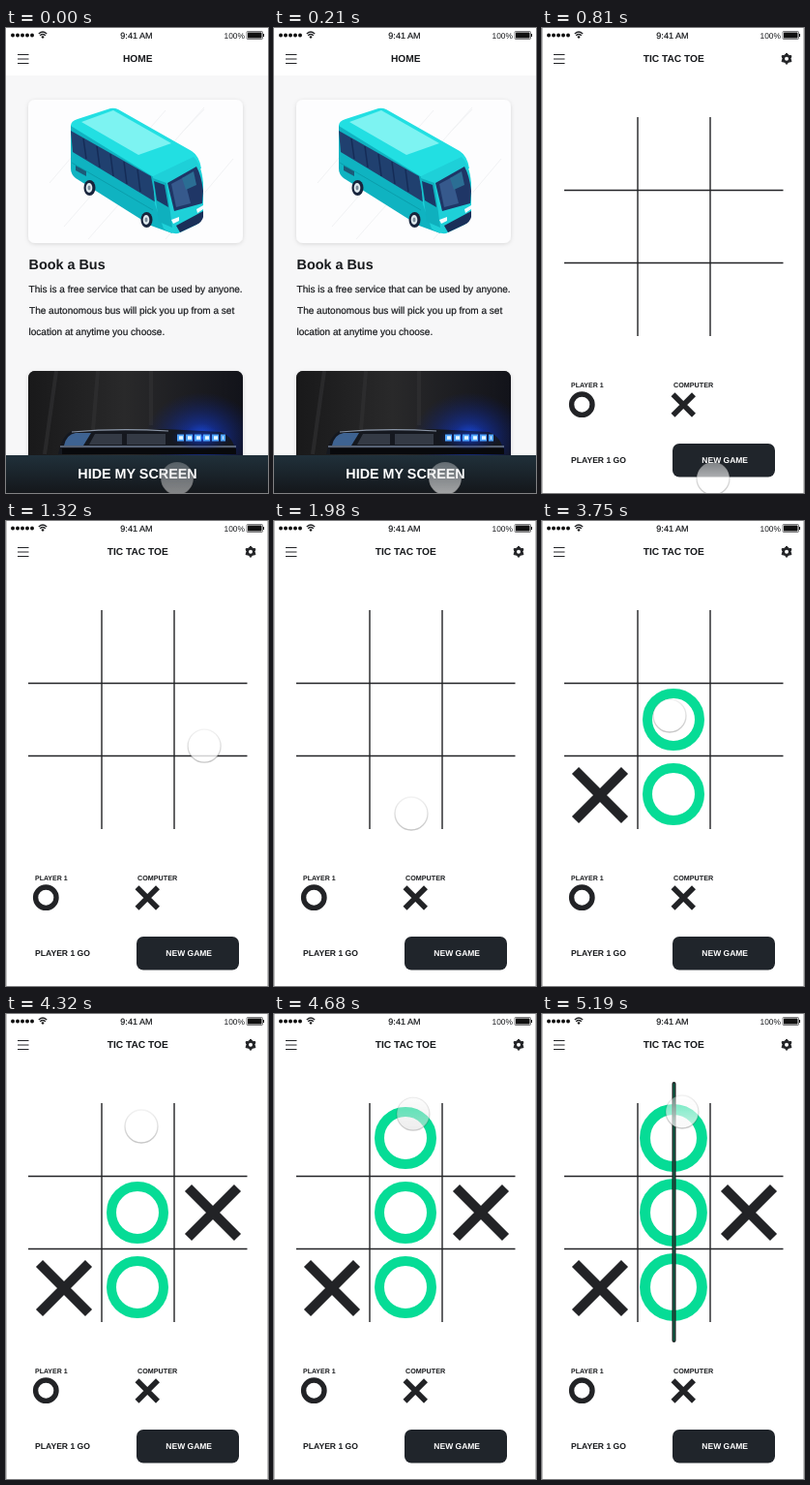
An HTML page for the animation above (5.22 s loop, 271 px wide and 480 px high).

```html
<!DOCTYPE html>
<html lang="en">
<head>
<meta charset="utf-8">
<title>Tic Tac Toe</title>
<style>
html, body { margin: 0; width: 100%; height: 100%; overflow: hidden; background: #fff; }
svg { display: block; width: 271px; height: 480px; }
text { font-family: "Liberation Sans", Arial, sans-serif; fill: #17191c; text-rendering: geometricPrecision; }
.b { font-weight: bold; }
.mid { text-anchor: middle; }
.dark { stroke: #17191c; stroke-width: .2; }
.ink { stroke: #222326; fill: none; }
.ring { stroke: #06dc96; stroke-width: 10; fill: none; }
</style>
</head>
<body>
<svg viewBox="0 0 271 480">
<defs>
  <linearGradient id="bar" x2="0" y2="1"><stop stop-color="#20303a"/><stop offset="1" stop-color="#14171b"/></linearGradient>
  <linearGradient id="night"><stop stop-color="#19191a"/><stop offset=".45" stop-color="#29292a"/><stop offset="1" stop-color="#12131a"/></linearGradient>
  <radialGradient id="glow"><stop stop-color="#2463ff"/><stop offset=".3" stop-color="#1238c4" stop-opacity=".6"/><stop offset="1" stop-color="#0a1e80" stop-opacity="0"/></radialGradient>
  <linearGradient id="knob" x2="0" y2="1"><stop stop-color="#fff" stop-opacity=".42"/><stop offset="1" stop-color="#fff" stop-opacity=".88"/></linearGradient>
  <linearGradient id="rim" x2="0" y2="1"><stop stop-color="#000" stop-opacity=".05"/><stop offset="1" stop-color="#000" stop-opacity=".22"/></linearGradient>
  <linearGradient id="press" x2="0" y2="1"><stop stop-color="#555" stop-opacity=".04"/><stop offset="1" stop-color="#444" stop-opacity=".3"/></linearGradient>
  <filter id="soft" x="-10%" y="-10%" width="120%" height="125%"><feDropShadow dx="0" dy="1" stdDeviation="2" flood-opacity=".13"/></filter>
  <clipPath id="photo"><rect x="23" y="354" width="222" height="100" rx="7"/></clipPath>
  <path id="cross" d="M-25.5-25.5 25.5 25.5M25.5-25.5-25.5 25.5" class="ink" stroke-width="10"/>
  <path id="menu" d="M12 27.5h11.5M12 32h11.5M12 36.5h11.5" class="ink" stroke-width="1.2"/>
  <g id="wheel"><ellipse rx="6" ry="8" fill="#18243c"/><ellipse cx="-.5" rx="3.3" ry="5" fill="#dfe9ee"/><ellipse cx="-.5" rx="1.5" ry="2.4" fill="#7d8d9b"/></g>
</defs>

<g id="home">
  <rect width="271" height="480" fill="#f7f7f8"/>
  <rect width="271" height="49" fill="#fff"/>
  <use href="#menu"/>
  <text class="b mid" x="136.3" y="34.5" font-size="10.2">HOME</text>

  <rect x="23" y="74" width="222" height="148" rx="7" fill="#fdfdfe" filter="url(#soft)"/>
  <path d="M60 205 165 85M85 218 205 82M45 160 110 84M165 218 235 135M180 110 205 84" stroke="#f1f2f4" fill="none"/>
  <g stroke-linejoin="round">
    <path d="M67 100 152 148 172 212 150 204 72 155Q67 151 67 145Z" fill="#0fb3c1"/>
    <path d="M67 101Q67 96 74 94L108 83Q112 82 116 84L192 127Q200 132 202 145L153 154Z" fill="#22dfe2"/>
    <path d="M78 97 111 85 171 119 137 131Z" fill="#7df3f2"/>
    <path d="M67 106 150 153 155 180 69 128Z" fill="#20406f"/>
    <path d="M80 114 83 135M94 122 97 144M108 130 111 153M122 138 125 161M136 146 139 169" stroke="#152c57" stroke-width="1.5"/>
    <path d="M152 153 194 133Q202 140 204 160V190Q204 199 197 203L178 212Q170 213 163 207L154 182Z" fill="#1ed0d8"/>
    <path d="M152 155 166 160 172 206 158 200Z" fill="#0fb0be"/>
    <path d="M153 158 164 162 168 185 156 178Z" fill="#1b3767"/>
    <path d="M167 160 197 143Q202 152 204 168L203 181 174 189Z" fill="#1f3666"/>
    <path d="M171 161 184 154 191 181 176 185Z" fill="#36598c"/>
    <path d="M182 155 194 148 197 162 186 167Z" fill="#2b6e94"/>
    <path d="M176 204 204 189V195Q203 200 197 203L180 211Z" fill="#1a2f59"/>
    <path d="M171 198l8-3v4l-6 3zM197 187l7-4v4l-6 4z" fill="#f3fbff"/>
    <path d="M68 139 152 188" stroke="#0a9eac" fill="none"/>
    <path d="M72 142l11 6v5l-11-6z" fill="#1c5a78"/>
    <use href="#wheel" x="86.500" y="165"/><use href="#wheel" x="145.500" y="198"/>
  </g>

  <text class="b" x="23.5" y="249" font-size="14.4">Book a Bus</text>
  <g font-size="10.05" class="dark">
    <text x="23.5" y="273">This is a free service that can be used by anyone.</text>
    <text x="24" y="295">The autonomous bus will pick you up from a set</text>
    <text x="23.5" y="316.5">location at anytime you choose.</text>
  </g>

  <rect x="23" y="354" width="222" height="100" rx="7" fill="#222" filter="url(#soft)"/>
  <g clip-path="url(#photo)">
    <rect x="23" y="354" width="222" height="100" fill="url(#night)"/>
    <path d="M52 354 40 440M95 354 90 415M150 354V410" stroke="#333335" stroke-width="4" opacity=".6"/>
    <ellipse cx="202" cy="422" rx="58" ry="46" fill="url(#glow)"/>
    <path d="M54 440Q58 420 68 416L165 414 222 417Q236 422 238 440Z" fill="#15181f"/>
    <path d="M60 431Q62 420 72 418H88L80 431Z" fill="#3e6392"/>
    <path d="M92 419H120V430H86ZM125 419H165V430H125Z" fill="#343a45"/>
    <path d="M68 417Q115 413 168 416" stroke="#8a95a6" stroke-width="1.2" fill="none"/>
    <path d="M56 432H238" stroke="#6f7d92" stroke-width="1.5"/>
    <path d="M58 437H238" stroke="#08090c" stroke-width="6"/>
    <ellipse cx="202" cy="423" rx="32" ry="13" fill="url(#glow)"/>
    <path d="M177 423H227" stroke="#4fa4ff" stroke-width="7" stroke-dasharray="7 2"/>
    <path d="M179 423H225" stroke="#e8f7ff" stroke-width="3.5" stroke-dasharray="4 5"/>
  </g>

  <rect y="441" width="271" height="39" fill="url(#bar)"/>
  <text class="b mid" x="136" y="465" font-size="14.35" style="fill:#fff">HIDE MY SCREEN</text>
</g>

<g id="game">
  <rect width="271" height="480" fill="#fff"/>
  <path d="M.5 0V480M270.5 0V480" stroke="#c4c4c4"/>
  <use href="#menu"/>
  <text class="b mid" x="136.2" y="34.5" font-size="10.2">TIC TAC TOE</text>
  <g transform="translate(253 31.7)">
    <path d="M0-5.8 1.9-3.5 5-2.9 4 0 5 2.9 1.9 3.5 0 5.8-1.9 3.5-5 2.9-4 0-5-2.9-1.9-3.5Z" fill="#222326" stroke="#222326" stroke-linejoin="round"/>
    <circle r="2" fill="#fff"/>
  </g>
  <path d="M99 92V318M174 92V318M23 167.5H249.5M23 242.5H249.5" class="ink" stroke-width="1.4"/>
  <g class="b">
    <text x="30" y="370.5" font-size="7">PLAYER 1</text>
    <text x="136" y="370.5" font-size="7.2">COMPUTER</text>
    <text x="30" y="449" font-size="8.6">PLAYER 1 GO</text>
  </g>
  <circle cx="41.3" cy="388.7" r="10.7" class="ink" stroke-width="5.4"/>
  <path d="M135.5 378.2 157 399.7M157 378.2 135.5 399.7" class="ink" stroke-width="5.6"/>
  <rect x="135" y="429" width="106" height="34.5" rx="7" fill="#20252b"/>
  <text class="b mid" x="189.2" y="449.3" font-size="8.5" style="fill:#fff">NEW GAME</text>
  <g id="marks"></g>
  <g fill="none" stroke-linecap="round">
    <path id="win" stroke="#1c2423" stroke-width="4"/>
    <path id="core" stroke="#0b6f50" stroke-width="1.2"/>
  </g>
</g>

<g id="status">
  <g fill="#111">
    <circle cx="7" cy="7.5" r="2"/><circle cx="12" cy="7.5" r="2"/><circle cx="17" cy="7.5" r="2"/><circle cx="22" cy="7.5" r="2"/><circle cx="27" cy="7.5" r="2"/>
    <path d="M36.300 9 38 11 39.700 9Q38 7.600 36.300 9Z"/>
    <rect x="250" y="4.5" width="14.5" height="6" rx=".5"/>
    <rect x="266" y="6" width="1" height="3"/>
  </g>
  <path d="M33.800 6Q38 2 42.200 6M35.200 7.800Q38 5.200 40.800 7.800" class="ink" stroke-width="1.2"/>
  <rect x="249" y="3.5" width="16.5" height="8" rx="1" class="ink" stroke-width=".6"/>
  <text class="mid dark" x="135" y="10.8" font-size="9.1">9:41 AM</text>
  <text x="225.5" y="10.8" font-size="8.4">100%</text>
</g>

<g id="cursor">
  <circle id="up" r="17" fill="url(#knob)" stroke="url(#rim)" stroke-width="1.3"/>
  <circle id="down" r="17" fill="url(#press)" stroke="#000" stroke-opacity=".16" stroke-width=".8"/>
</g>
</svg>
<script>
const LOOP = 5220;
const $ = id => document.getElementById(id);
const clamp = v => Math.max(0, Math.min(1, v));
const ramp = (t, a, b) => clamp((t - a) / (b - a));
const ease = p => p * p * (3 - 2 * p);

// Touch keys: time, x, y, press
const touch = [
  [0, 177, 465, .4], [150, 177, 465, .4], [300, 177, 465, 0], [840, 177, 465, 0],
  [1110, 197, 238, 0], [1290, 206, 231, 0], [1640, 166, 284, 0], [1980, 142, 302, 0],
  [2060, 140, 300, 0], [2130, 139, 296, 1], [2720, 138, 292, 1], [2850, 138, 288, 0],
  [3240, 135, 207, 0], [3400, 133, 202, 0], [3470, 132, 201, 1], [3600, 132, 201, 0],
  [3800, 132, 201, 0], [4200, 140, 114, 0], [4320, 140, 116, 0], [4480, 142, 110, 0],
  [4550, 143, 107, 1], [4700, 144, 103, .3], [4900, 145, 101, .15], [LOOP, 145, 101, .1]
];

// Moves: time, x, y, mark
const moves = [
  [2130, 136, 282, 'O'], [2460, 60, 283, 'X'], [3470, 136, 205, 'O'],
  [3795, 214, 205, 'X'], [4550, 136, 128, 'O']
];
$('marks').innerHTML = moves.map(m => m[3] === 'O'
  ? '<circle r="27" class="ring"/>' : '<use href="#cross"/>').join('');
const marks = [...$('marks').children];

function touchAt(t) {
  const i = Math.max(1, touch.findIndex(k => k[0] > t));
  const a = touch[i - 1], b = touch[i], p = ease(ramp(t, a[0], b[0]));
  return a.map((v, j) => v + (b[j] - v) * p);
}

function draw(now) {
  const t = now % LOOP;
  $('game').setAttribute('opacity', ease(ramp(t, 240, 450)));

  const pulse = 1 + .09 * ease(ramp(t, 4920, 5160));
  moves.forEach(([start, x, y, mark], i) => {
    marks[i].setAttribute('visibility', t >= start ? 'inherit' : 'hidden');
    marks[i].setAttribute('transform', `translate(${x} ${y}) scale(${mark === 'O' ? pulse : 1})`);
  });

  const line = ease(ramp(t, 4770, 5040));
  const d = line ? `M136.5 72V${72 + 265 * line}` : '';
  $('win').setAttribute('d', d);
  $('core').setAttribute('d', d);

  const [, x, y, press] = touchAt(t);
  $('cursor').setAttribute('transform', `translate(${x} ${y})`);
  $('up').setAttribute('opacity', 1 - press);
  $('down').setAttribute('opacity', press);
}

const begin = performance.now();
function tick() {
  draw(performance.now() - begin);
  requestAnimationFrame(tick);
}
tick();
</script>
</body>
</html>
```
